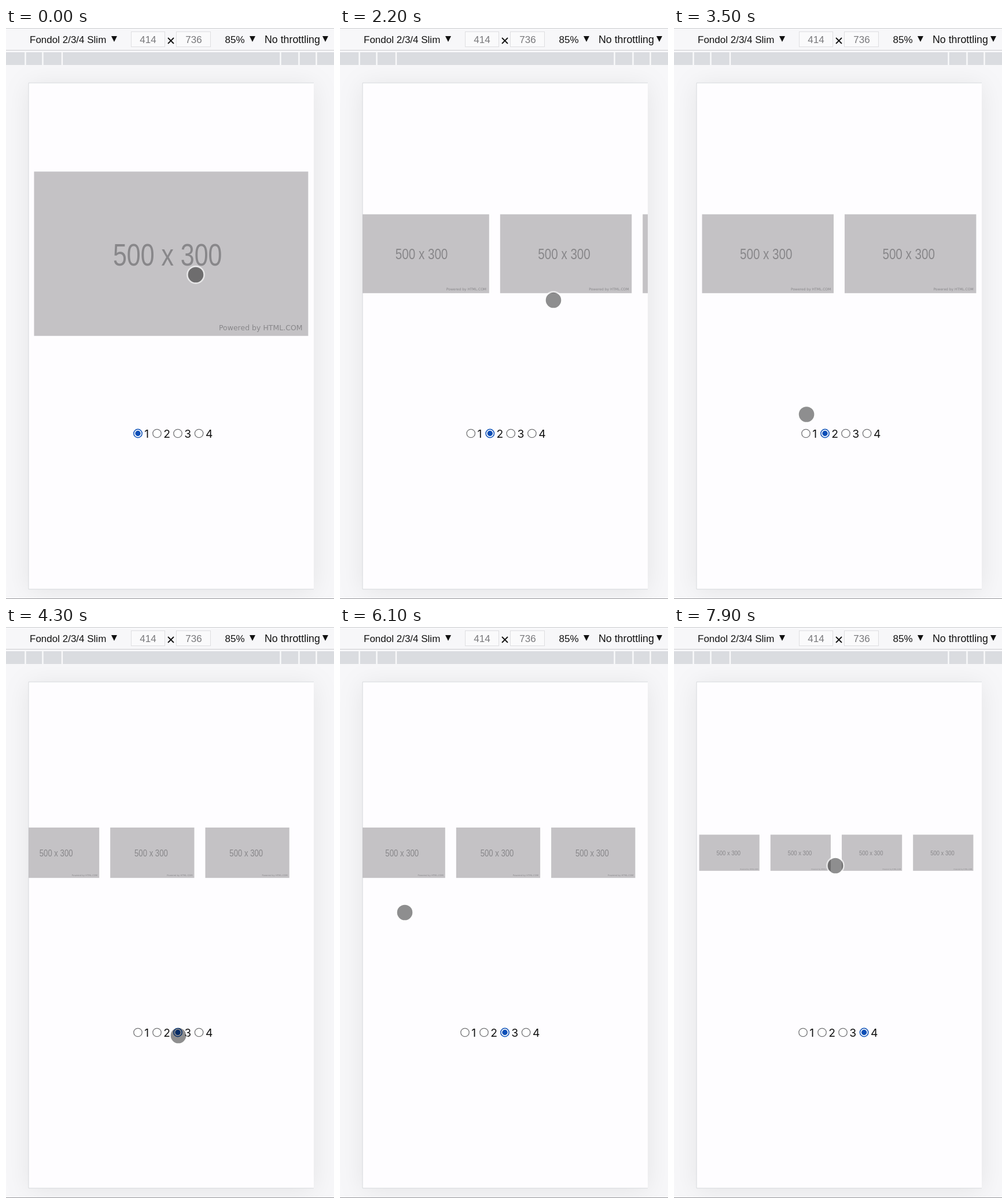
These frames come from a looping animation (567 px wide and 988 px high, 8 s). An HTML page:

```html
<!DOCTYPE html>
<html lang="en">
<head>
<meta charset="utf-8">
<title>Responsive carousel</title>
<style>
  html, body { margin: 0; width: 100%; height: 100%; overflow: hidden; background: #f7f7f9; }
  svg { display: block; width: 100vw; height: 100vh; }
  text { font: 17px "Liberation Sans", Arial, sans-serif; fill: #111; }
  .size { fill: #77777a; text-anchor: middle; }
  .box { fill: #fafafb; stroke: #dedee1; }
  .phone { fill: #fefdff; filter: drop-shadow(0 4px 22px rgba(0, 0, 0, .08)); }
  .caption { font-size: 53px; text-anchor: middle; fill: #88878a; }
  .credit { font: 12.5px "DejaVu Sans", sans-serif; text-anchor: end; fill: #88878a; }
  .label { font: 19.3px Inter, sans-serif; }
  .ring { fill: #fff; stroke: #727275; stroke-width: 1.3; }
  .dot { fill: #0b4fb7; visibility: hidden; }
  .checked .ring { stroke: #0b4fb7; stroke-width: 1.5; }
  .checked .dot { visibility: visible; }
</style>
</head>
<body>
<svg viewBox="0 0 567 988">
  <defs>
    <clipPath id="screen"><rect x="39" y="95" width="493" height="876"/></clipPath>
    <path id="arrow" d="M-5 -5H5L0 5Z" fill="#111"/>
    <g id="card">
      <rect width="473.9" height="284.3" fill="#c4c2c5"/>
      <text class="caption" transform="translate(230.7 162.5) scale(.81 1)">500 x 300</text>
      <text class="credit" x="464" y="274.8">Powered by HTML.COM</text>
    </g>
  </defs>

  <rect width="567" height="988" fill="#f7f7f9"/>
  <rect class="phone" x="39" y="95" width="493" height="876"/>
  <path d="M532 95H39V971H532" fill="none" stroke="#d6d9dc"/>

  <rect width="567" height="64" fill="#f7f7f9"/>
  <path d="M0 .5H567M0 38.5H567" stroke="#cbcccf"/>
  <text x="41" y="25.5">Fondol 2/3/4 Slim</text>
  <use href="#arrow" x="187" y="19"/>
  <rect class="box" x="216.5" y="6.5" width="58" height="26"/>
  <text class="size" x="245.5" y="25.5">414</text>
  <path d="M280 17L290 27M290 17L280 27" stroke="#111" stroke-width="1.8"/>
  <rect class="box" x="294.5" y="6.5" width="59" height="26"/>
  <text class="size" x="324.5" y="25.5">736</text>
  <text x="378.5" y="25.5">85%</text>
  <use href="#arrow" x="426" y="19"/>
  <text x="447" y="25.5" style="font-size:17.8px">No throttling</text>
  <use href="#arrow" x="552" y="19"/>
  <rect y="42" width="567" height="22" fill="#dadce0"/>
  <path d="M33.5 42v22M63.5 42v22M97 42v22M474.5 42v22M506.5 42v22M536.5 42v22"
        stroke="#fafafb" stroke-width="2.4"/>
  <path d="M0 987.5H567" stroke="#96969a"/>

  <g clip-path="url(#screen)">
    <g id="page"><g id="slides"></g><g id="radios"></g></g>
  </g>
  <g id="cursor">
    <circle r="14.6" fill="none" stroke="#fff" stroke-opacity=".6" stroke-width="2.6"/>
    <circle r="13.3" fill-opacity=".44"/>
  </g>
</svg>
<script>
const LOOP = 8000, STEP = 100;
const LEFT = 39, MIDDLE = 390.6, VIEW = 492.9, GAP = 9.5;
const CARD_WIDTH = VIEW - 2 * GAP, CARD_HEIGHT = CARD_WIDTH * .6;
const SLIDE_TIME = 400, PULL_TIME = 500, PULL = 12;

// Where the pointer turns: swipes across the cards, clicks on the radios.
const turns = [
  { at: 0, x: 328, y: 427 }, { at: 300, x: 24, y: 440 },
  { at: 900, x: 220, y: 718 }, { at: 1000, x: 241, y: 706 }, { at: 1300, x: 262, y: 712 },
  { at: 2200, x: 369, y: 471 }, { at: 2800, x: 402, y: 438 }, { at: 3100, x: 55, y: 450 },
  { at: 3700, x: 290, y: 745 }, { at: 4300, x: 298, y: 707 },
  { at: 4700, x: 242, y: 386 }, { at: 5300, x: 550, y: 400 }, { at: 6100, x: 112, y: 494 },
  { at: 6700, x: 343, y: 705 }, { at: 7900, x: 279, y: 413 }, { at: LOOP, x: 274, y: 408 }
];
// Cards per view and the first card in view, each reached by sliding.
const views = [
  { at: 0, count: 1, first: 0 }, { at: 50, count: 1, first: 1 },
  { at: 1250, count: 2, first: 1 }, { at: 2137, count: 2, first: 2 },
  { at: 3978, count: 3, first: 1 }, { at: 4950, count: 3, first: 0 },
  { at: 5600, count: 3, first: 1 }, { at: 6900, count: 4, first: 0 }
];
// Starts of the moments when the whole page is pulled left and springs back.
const pulls = [2177, 5850, 7832];

const byId = id => document.getElementById(id);
const place = (el, x, y, s = 1) => el.setAttribute("transform", `translate(${x} ${y}) scale(${s})`);
const ease = p => p * p * (3 - 2 * p);
const mix = (a, b, p) => a + (b - a) * p;
const progress = (t, start, duration) => Math.min(1, Math.max(0, (t - start) / duration));
const lastIndex = (events, t) => events.findLastIndex(event => event.at <= t);

function cursorAt(t) {
  const i = lastIndex(turns, t), a = turns[i], b = turns[i + 1];
  const p = ease(progress(t, a.at, b.at - a.at));
  return [mix(a.x, b.x, p), mix(a.y, b.y, p)];
}

function viewAt(t) {
  const i = lastIndex(views, t), view = views[i], previous = views[Math.max(0, i - 1)];
  const rest = ({ count, first }) => first * VIEW / count;
  const p = ease(progress(t, view.at, SLIDE_TIME));
  return { count: view.count, scroll: mix(rest(previous), rest(view), p) };
}

const pullAt = t => pulls.reduce(
  (x, start) => x - PULL * Math.sin(Math.PI * progress(t, start, PULL_TIME)), 0);

byId("slides").innerHTML = '<use href="#card"/>'.repeat(4);
byId("radios").innerHTML = [228, 261, 297, 333.6].map((x, i) =>
  `<g><circle class="ring" cx="${x}" cy="701.5" r="7.2"/><circle class="dot" cx="${x}" cy="701.5" r="4.7"/>
   <text class="label" x="${x + 11.3}" y="709">${i + 1}</text></g>`).join("");
const slides = [...byId("slides").children], radios = [...byId("radios").children];

function draw(t) {
  const { count, scroll } = viewAt(t);
  const pitch = VIEW / count, scale = (pitch - 2 * GAP) / CARD_WIDTH;
  const top = MIDDLE - CARD_HEIGHT * scale / 2;

  place(byId("page"), pullAt(t), 0);
  slides.forEach((slide, i) => place(slide, LEFT + GAP + i * pitch - scroll, top, scale));
  radios.forEach((radio, i) => radio.classList.toggle("checked", i === count - 1));
  place(byId("cursor"), ...cursorAt(t));
}

// The picture advances ten times a second; the small lead absorbs timer jitter.
const begin = performance.now();
function tick() {
  const steps = Math.floor((performance.now() - begin) / STEP + .25);
  draw(steps * STEP % LOOP);
  requestAnimationFrame(tick);
}
tick();
</script>
</body>
</html>
```
